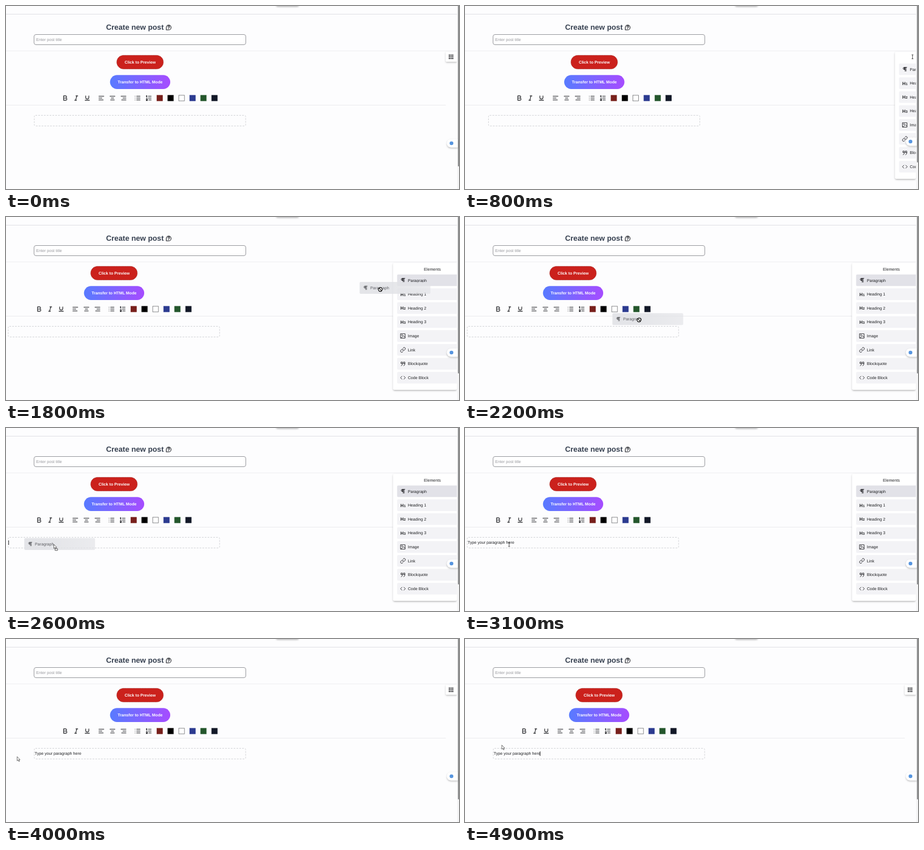
Animation of 800x324 px, one loop 5000 ms. Source, as an HTML page:

```html
<!DOCTYPE html>
<html lang="en">
<head>
<meta charset="utf-8">
<title>Post editor</title>
<style>
html, body { margin: 0; width: 100%; height: 100%; overflow: hidden; background: #fdfdfe; }
svg { display: block; width: 800px; height: 324px; }
text { font: 7.15px "Liberation Sans", Arial, sans-serif; fill: #1f2023; text-rendering: geometricPrecision; }
.bold { font-weight: 700; }
.mid { text-anchor: middle; }
.ico { fill: none; stroke: #15161a; stroke-width: 2; stroke-linecap: round; stroke-linejoin: round; }
</style>
</head>
<body>
<svg id="stage" viewBox="0 0 800 324" xmlns="http://www.w3.org/2000/svg">
  <defs>
    <linearGradient id="violet"><stop stop-color="#587bff"/><stop offset="1" stop-color="#a64cff"/></linearGradient>
    <linearGradient id="fade"><stop offset=".3" stop-color="#e1e2e6"/><stop offset="1" stop-color="#e1e2e6" stop-opacity=".72"/></linearGradient>
    <filter id="shadow" x="-30%" y="-30%" width="160%" height="170%">
      <feDropShadow dx="0" dy="1.5" stdDeviation="1.8" flood-color="#000" flood-opacity=".28"/>
    </filter>
    <clipPath id="view"><rect width="796.5" height="324"/></clipPath>
  </defs>
  <rect width="800" height="324" fill="#fdfdfe"/>
  <rect x="477" y="-9" width="40" height="9" rx="3" fill="#fff" filter="url(#shadow)"/>
  <path d="M0 14.5H797" stroke="#dfe0e4"/>
  <path d="M0 79.5H797" stroke="#eeeef1"/>
  <path id="rule" stroke="#ebebee"/>
  <text class="bold" x="176.7" y="42.3" style="font-size:13.2px;fill:#374151">Create new post</text>
  <g fill="none" stroke="#17191f" stroke-width="1.1" stroke-linecap="round" stroke-linejoin="round">
    <path d="M283.1 42.3V38a4.2 4.2 0 1 1 4.2 4.3z"/>
    <path d="M285.9 36.9a1.4 1.4 0 1 1 2 1.2q-.6.3-.6.8M287.3 40.3v.1"/>
  </g>
  <rect x="49.5" y="50.5" width="374" height="18" rx="3.5" fill="#fff" stroke="#96979c"/>
  <text x="53.2" y="61.7" style="fill:#97989d">Enter post title</text>

  <g id="editor">
    <rect x="195.6" y="87.3" width="82.3" height="24.2" rx="12.1" fill="#cb211c" stroke="#941b17" stroke-width=".8" stroke-dasharray="1.5 1.2"/>
    <text class="bold mid" x="236.9" y="101.9" style="fill:#fff">Click to Preview</text>
    <rect x="183.7" y="122.3" width="106.4" height="24.6" rx="12.3" fill="url(#violet)"/>
    <text class="bold mid" x="236.9" y="137.1" style="fill:#fff">Transfer to HTML Mode</text>
    <g id="tools"></g>
    <rect x="50" y="193.6" width="373.2" height="18.8" rx="2" fill="none" stroke="#cdced2" stroke-width=".9" stroke-dasharray="3 2"/>
    <text id="para" x="50.7" y="205.4">Type your paragraph here</text>
    <path id="caret" stroke="#111" stroke-width=".9"/>
  </g>

  <g clip-path="url(#view)">
    <g id="launcher">
      <rect id="tile" y="81" height="17.5" rx="1.5" fill="#fff" filter="url(#shadow)"/>
      <g id="dots" fill="#17181c"></g>
    </g>
    <g id="panel">
      <rect id="sheet" y="81" height="225" rx="3" fill="#fff" filter="url(#shadow)"/>
      <g id="list"></g>
    </g>
  </g>
  <rect x="796.7" width="3.3" height="324" fill="#f5f5f6"/>
  <rect id="thumb" x="798.2" y="-2" width="1.8" rx=".8" fill="#858688"/>
  <g id="widget">
    <path d="M798 -7.3H786a7.3 7.3 0 0 0 0 14.6H798z" fill="#fff" filter="url(#shadow)"/>
    <circle cx="786.7" r="3.3" fill="#5795df"/>
  </g>
  <g id="ghost">
    <rect width="125" height="21" rx="2" fill="url(#fade)" opacity=".9"/>
  </g>
  <g id="pointer"></g>
</svg>
<script>
const NS = 'http://www.w3.org/2000/svg';
const $ = id => document.getElementById(id);
const LOOP = 5000, STEP = 100, DROP = 2900;

function add(parent, tag, attrs, text) {
  const el = document.createElementNS(NS, tag);
  for (const k in attrs) el.setAttribute(k, attrs[k]);
  if (text) el.textContent = text;
  return parent.appendChild(el);
}
function icon(parent, d, x, y, scale) {
  return add(parent, 'path', { d, class: 'ico', transform: `translate(${x} ${y}) scale(${scale}) translate(-12 -12)` });
}
const move = (el, x, y) => el.setAttribute('transform', `translate(${x} ${y})`);
const show = (el, on) => { el.style.display = on ? '' : 'none'; };

// Toolbar
const tools = [
  [104.5, 'M7 5h6a3.5 3.5 0 0 1 0 7H7zM13 12h1a3.5 3.5 0 0 1 0 7H7v-7'],
  [124, 'M11 5h6M7 19h6M14 5l-4 14'],
  [143.5, 'M7 5v5a5 5 0 0 0 10 0V5M5 19h14'],
  [168.4, 'M4 6h16M4 12h10M4 18h14'],
  [188, 'M4 6h16M8 12h8M6 18h12'],
  [207.5, 'M4 6h16M10 12h10M6 18h14'],
  [232.4, 'M9 6h11M9 12h11M9 18h11M4 6v.01M4 12v.01M4 18v.01'],
  [252, 'M11 6h9M11 12h9M12 18h8M4 16a2 2 0 1 1 4 0c0 .6-.5 1-1 1.5L4 20h4M6 10V4L4 6']
];
tools.forEach(([x, d]) => icon($('tools'), d, x, 163, .55));
['#78201c', '#000', '#fff', '#2c3b90', '#24562c', '#121827'].forEach((fill, i) =>
  add($('tools'), 'rect', { x: 266.4 + i * 19.35, y: 158, width: 10, height: 10, fill,
    stroke: fill === '#fff' ? '#55565a' : fill, 'stroke-width': .7 }));

for (let i = 0; i < 9; i++)
  add($('dots'), 'rect', { x: -4 + i % 3 * 3, y: 85.9 + Math.floor(i / 3) * 3, width: 2, height: 2, rx: .5 });

// Element list, measured from the panel's left edge
const PILCROW = 'M13 4v16M17 4v16M20 4H9.5a4.5 4.5 0 0 0 0 9H13M9.5 5v7M11.5 5v7';
const rows = [
  ['Paragraph', PILCROW], ['Heading 1', '1'], ['Heading 2', '2'], ['Heading 3', '3'],
  ['Image', 'M3 3h18v18H3zM7 8.5a1.5 1.5 0 1 0 3 0a1.5 1.5 0 1 0-3 0M4 20l10-9 7 6'],
  ['Link', 'M10 14a5 5 0 0 0 7 0l4-4a5 5 0 0 0-7-7l-1 1M14 10a5 5 0 0 0-7 0l-4 4a5 5 0 0 0 7 7l1-1'],
  ['Blockquote', 'M10 11H4V5h6v8q0 5-5 7M20 11h-6V5h6v8q0 5-5 7'],
  ['Code Block', 'M8 6l-6 6 6 6M16 6l6 6-6 6']
];
add($('list'), 'text', { x: 69.3, y: 95, class: 'mid' }, 'Elements');
const rects = rows.map(([name, art], i) => {
  const y = 112 + i * 24.65;
  const r = add($('list'), 'rect', { x: 7, y: y - 10.3, width: 125, height: 20.6, rx: 2, fill: '#f3f3f6' });
  if (art.length === 1) {
    add($('list'), 'text', { x: 12.7, y: y + 2.9, class: 'bold', style: 'font-size:8px' }, 'H');
    add($('list'), 'text', { x: 18.7, y: y + 2.9, class: 'bold', style: 'font-size:6px' }, art);
  } else icon($('list'), art, 17.3, y, .43);
  add($('list'), 'text', { x: 26, y: y + 2.5 }, name);
  return r;
});
icon($('ghost'), PILCROW, 10.3, 10.5, .4).style.stroke = '#4b4c50';
add($('ghost'), 'text', { x: 18.8, y: 13, style: 'fill:#5c5d62' }, 'Paragraph');

// Pointer shapes, hot spot at 0,0
const ARROW = 'M0 0V7.4L1.8 5.8 3 8.5 4.2 8 3 5.4H5.2z';
const shapes = {};
function shape(name, ...paths) {
  const g = shapes[name] = add($('pointer'), 'g', {});
  paths.forEach(([d, fill, stroke, w]) =>
    add(g, 'path', { d, fill, stroke, 'stroke-width': w, 'stroke-linejoin': 'round' }));
}
shape('arrow', [ARROW, '#fff', '#333', .7]);
shape('copy', [ARROW, '#fff', '#333', .7], ['M2.2 7.6h4.3v3.2H2.2z', '#fff', '#333', .8]);
shape('beam', ['M-1.5 -3.5H1.5M0 -3.5V3.5M-1.5 3.5H1.5', 'none', '#222', .8]);
shape('hand', ['M-.7 5V.5q.7-1 1.4 0V3.2l3 .8q.8.3.6 1.3L3.8 8H.4L-2.4 4.8q.3-.9 1.7.2z', '#fff', '#222', .7]);
shape('ban', ['M-3.4 0a3.4 3.4 0 1 0 6.8 0a3.4 3.4 0 1 0-6.8 0M-2.4 -2.4L2.4 2.4', '#fff', '#111', 1.2]);

// time, x, y, shape
const pointerPath = [
  [200, 700, 238, 'arrow'], [400, 752, 165, 'arrow'], [600, 785, 92, 'hand'], [800, 790.3, 90, 'beam'],
  [1000, 772, 94, 'arrow'], [1300, 728, 114, 'hand'], [1500, 727, 115, 'hand'], [1600, 718, 117, 'ban'],
  [1800, 661, 128.3, 'ban'], [2100, 395, 172, 'ban'], [2400, 132, 203, 'copy'], [2600, 84.5, 206, 'copy'],
  [DROP, 79, 206, 'beam'], [3600, 75.3, 207, 'beam'], [3800, 45, 208, 'arrow'], [4000, 19.7, 208.3, 'arrow'],
  [4300, 17, 208.5, 'arrow'], [4700, 65, 187.8, 'arrow'], [LOOP, 65, 187.8, 'arrow']
];
const ghostPath = [
  [1600, 684, 104], [1800, 624.5, 115], [2100, 350, 160], [2400, 81, 191], [2600, 32.3, 195], [DROP, 26, 195]
];
function along(path, t) {
  let i = path.length - 2;
  while (i > 0 && path[i][0] > t) i--;
  const a = path[i], b = path[i + 1];
  const k = Math.min(1, Math.max(0, (t - a[0]) / (b[0] - a[0])));
  return [a[1] + (b[1] - a[1]) * k, a[2] + (b[2] - a[2]) * k, t >= b[0] ? b[3] : a[3]];
}

// The standard CSS "ease" curve
function ease(x) {
  if (x <= 0) return 0;
  if (x >= 1) return 1;
  const bez = (p, q, s) => 3 * p * s * (1 - s) ** 2 + 3 * q * s * s * (1 - s) + s ** 3;
  let lo = 0, hi = 1;
  for (let i = 0; i < 24; i++) {
    const m = (lo + hi) / 2;
    if (bez(.25, .25, m) < x) lo = m; else hi = m;
  }
  return bez(.1, 1, lo);
}

function draw(t) {
  const open = t > 755 && t < 3650;
  const amount = ease((t - 755) / 300) - ease((t - 3650) / 300);
  const left = 776.7 - 93 * amount;

  move($('editor'), -46 * amount, 0);
  $('rule').setAttribute('d', `M0 175.5H${left}`);
  show($('launcher'), !open);
  show($('panel'), open);
  for (const id of ['tile', 'sheet']) {
    $(id).setAttribute('x', left);
    $(id).setAttribute('width', 796.2 - left);
  }
  move($('dots'), (left + 796) / 2 - .4, 0);
  move($('list'), left, 0);
  rects[0].setAttribute('fill', t >= 1300 ? '#e2e2e8' : '#f3f3f6');
  $('thumb').setAttribute('height', open ? 279 : 286);
  move($('widget'), 0, open ? 240 : 243);

  const dropped = t >= DROP;
  const aiming = t >= 2400 && !dropped;
  show($('para'), dropped);
  show($('caret'), aiming || dropped && Math.floor(t / 500) % 2 === 1);
  $('caret').setAttribute('d', `M${aiming ? 50.7 : 132.6} 199v8`);

  const dragging = t >= 1600 && !dropped;
  show($('ghost'), dragging);
  const [gx, gy] = along(ghostPath, t);
  move($('ghost'), gx, gy);

  const [px, py, kind] = along(pointerPath, t);
  show($('pointer'), t >= 200);
  move($('pointer'), px, py);
  for (const name in shapes) show(shapes[name], name === kind);
}

const start = performance.now();
function tick() {
  const t = (performance.now() - start) % LOOP;
  draw(Math.floor(t / STEP) * STEP);
  requestAnimationFrame(tick);
}
tick();
</script>
</body>
</html>
```
